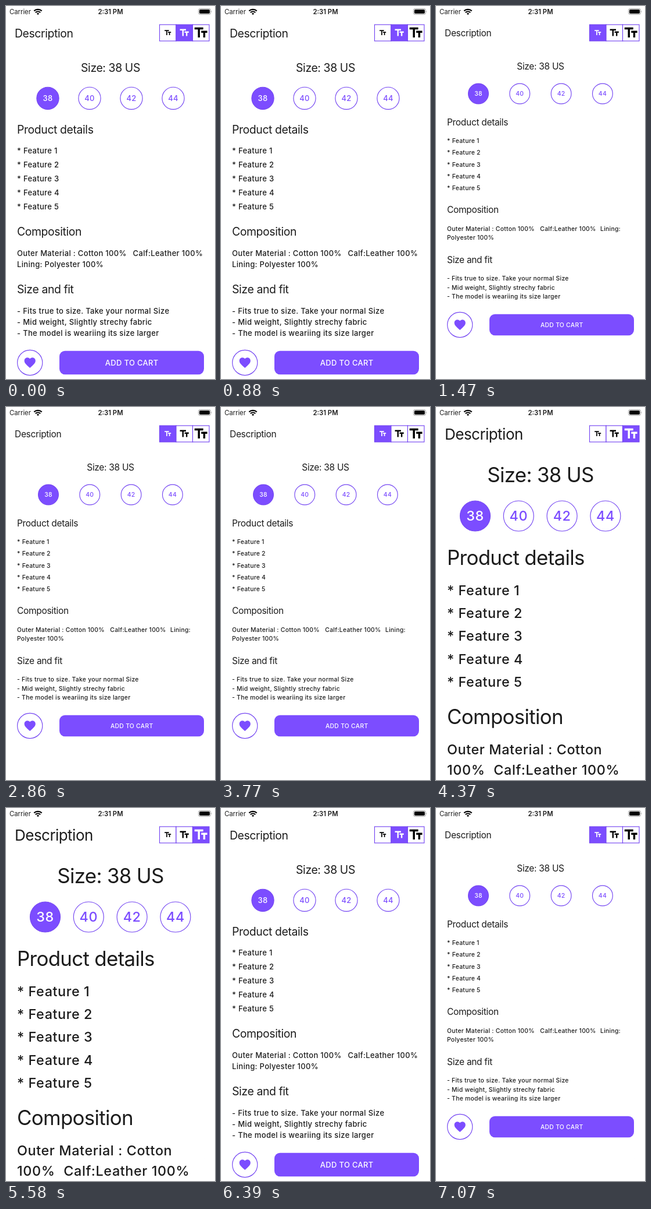
Animation of 360 by 640 pixels, one loop 8.42 s. Source, as an HTML page:

```html
<!DOCTYPE html>
<html lang="en">
<head>
<meta charset="utf-8">
<title>Text size switcher</title>
<style>
  html, body { margin: 0; width: 100%; height: 100%; overflow: hidden; background: #fff; }
  svg { display: block; width: 100%; height: 100%; }
  text { font-family: Inter, Roboto, sans-serif; font-optical-sizing: none; white-space: pre; fill: #1c1c1c; }
  .head { letter-spacing: -.02em; }
  .body { letter-spacing: .025em; font-weight: 500; }
  .mid { text-anchor: middle; }
  .ring { fill: #fff; stroke: #7446f2; stroke-width: 1.15; }
  .ring.on, .purple, text.purple { fill: #7c4dff; }
  .white, text.white { fill: #fff; }
  .status { font-size: 11.3px; }
  .line { fill: none; stroke: #000; stroke-width: 2.1; }
</style>
</head>
<body>
<svg viewBox="0 0 360 640">
  <text class="status" x="6" y="13.7">Carrier</text>
  <path class="line" d="M48.3 8.6a9.5 9.5 0 0 1 13.4 0M50.8 11.2a5.9 5.9 0 0 1 8.4 0"/>
  <path d="M55 15.2l-2.1-2.2a3 3 0 0 1 4.2 0z"/>
  <text class="status mid" x="180" y="13.7" font-weight="600">2:31 PM</text>
  <rect x="331.5" y="4.5" width="21" height="10" rx="3" fill="none" stroke="#999"/>
  <rect x="333" y="6" width="18" height="7" rx="1.7"/>
  <path d="M353.6 7.8q1.6 1.7 0 3.4z" fill="#999"/>
  <g id="page"></g>
</svg>
<script>
const page = document.getElementById('page');

const HEART = 'M12 21.35l-1.45-1.32C5.4 15.36 2 12.28 2 8.5 2 5.42 4.42 3 7.5 3c1.74 0 3.41.81 4.5 2.09' +
  'C13.09 3.81 14.76 3 16.5 3 19.58 3 22 5.42 22 8.5c0 3.78-3.4 6.86-8.55 11.54z';
const LETTERS = 'M2.5 4v3h5v12h3V7h5V4h-13zm19 5h-9v3h3v7h3v-7h3V9z';
const FIT = ['- Fits true to size. Take your normal Size', '- Mid weight, Slightly strechy fabric',
  '- The model is weariing its size larger'];

// y values are text baselines; "fabric" holds runs of [x, y, text]
const small = {
  cell: 0, title: 15.5, titleY: 52, head: 15.5, body: 10.4, sizeY: 108.5,
  dots: { x: 73, step: 71.3, y: 150.5, r: 17.4 },
  detailsY: 204.5, featureY: 235.2, featureStep: 20.2, compositionY: 355,
  fabric: [[19, 385.8, 'Outer Material : Cotton 100%'], [179.3, 385.8, 'Calf:Leather 100%'],
    [283, 385.8, 'Lining:'], [19, 401.2, 'Polyester 100%']],
  fitY: 440.5, fitLineY: 471.3, fitStep: 15.3, barY: 547, barH: 36.6
};
const medium = {
  cell: 1, title: 19.4, titleY: 53.7, head: 19.4, body: 13, sizeY: 112.8,
  dots: { x: 72, step: 72, y: 158.3, r: 19.1 },
  detailsY: 219, featureY: 253.4, featureStep: 24, compositionY: 394,
  fabric: [[19, 429, 'Outer Material : Cotton 100%'], [218.6, 429, 'Calf:Leather 100%'],
    [19, 448, 'Lining: Polyester 100%']],
  fitY: 493, fitLineY: 527.7, fitStep: 19.1, barY: 612, barH: 40.4
};
const large = {
  cell: 2, title: 26, titleY: 56, head: 34.9, body: 23.4, sizeY: 129,
  dots: { x: 67.5, step: 74.8, y: 187, r: 26 },
  detailsY: 271, featureY: 322.5, featureStep: 39.4, compositionY: 544.3,
  fabric: [[19, 596.3, 'Outer Material : Cotton'], [19, 630.6, '100%'], [99.3, 630.6, 'Calf:Leather 100%']]
};

const LOOP = 8420;
const steps = [[0, medium], [1470, small], [4370, large], [6390, medium], [7070, small]];

const text = (x, y, size, cls, str) =>
  `<text x="${x}" y="${y}" font-size="${size}" class="${cls}">${str}</text>`;
const icon = (d, cx, cy, scale, cls) =>
  `<path d="${d}" class="${cls}" transform="translate(${cx} ${cy}) scale(${scale}) translate(-12 -12)"/>`;
const ring = (cx, cy, r, cls = '') => `<circle cx="${cx}" cy="${cy}" r="${r}" class="ring ${cls}"/>`;
const label = (cx, cy, size, color, str) => text(cx, cy + size * .36, size, 'body mid ' + color, str);

function switcher(active) {
  return [.58, .8, 1.15].map((scale, i) => {
    const x = 264.5 + i * 28.5, on = i === active;
    return `<rect x="${x}" y="32" width="28.5" height="28" class="ring ${on ? 'on' : ''}"/>` +
      icon(LETTERS, x + 14.2, 46, scale, on ? 'white' : '');
  }).join('');
}

function sizes({ x, step, y, r }, font) {
  return [38, 40, 42, 44].map((n, i) => {
    const cx = x + i * step;
    return ring(cx, y, r, i ? '' : 'on') + label(cx, y, font, i ? 'purple' : 'white', n);
  }).join('');
}

function bar(y, h, font) {
  return ring(41.2, y, 21.6) + icon(HEART, 41.2, y, .96, 'purple') +
    `<rect x="92" y="${y - h / 2}" width="249" height="${h}" rx="9.6" class="purple"/>` +
    label(216.7, y, font, 'white', 'ADD TO CART');
}

function draw(s) {
  const head = (y, str) => text(19, y, s.head, 'head', str);
  const body = (x, y, str) => text(x, y, s.body, 'body', str);
  let out = text(15, s.titleY, s.title, 'head', 'Description') + switcher(s.cell) +
    text(180, s.sizeY, s.head, 'head mid', 'Size: 38 US') + sizes(s.dots, s.body) +
    head(s.detailsY, 'Product details');
  for (let i = 0; i < 5; i++) out += body(19, s.featureY + i * s.featureStep, '* Feature ' + (i + 1));
  out += head(s.compositionY, 'Composition') + s.fabric.map(run => body(...run)).join('');
  if (s.fitY) {
    out += head(s.fitY, 'Size and fit') +
      FIT.map((str, i) => body(19, s.fitLineY + i * s.fitStep, str)).join('') +
      bar(s.barY, s.barH, s.body);
  }
  page.innerHTML = out;
}

let shown;
function tick() {
  const t = performance.now() % LOOP;
  const state = steps.findLast(([start]) => t >= start)[1];
  if (state !== shown) draw(shown = state);
  requestAnimationFrame(tick);
}
tick();
</script>
</body>
</html>
```
